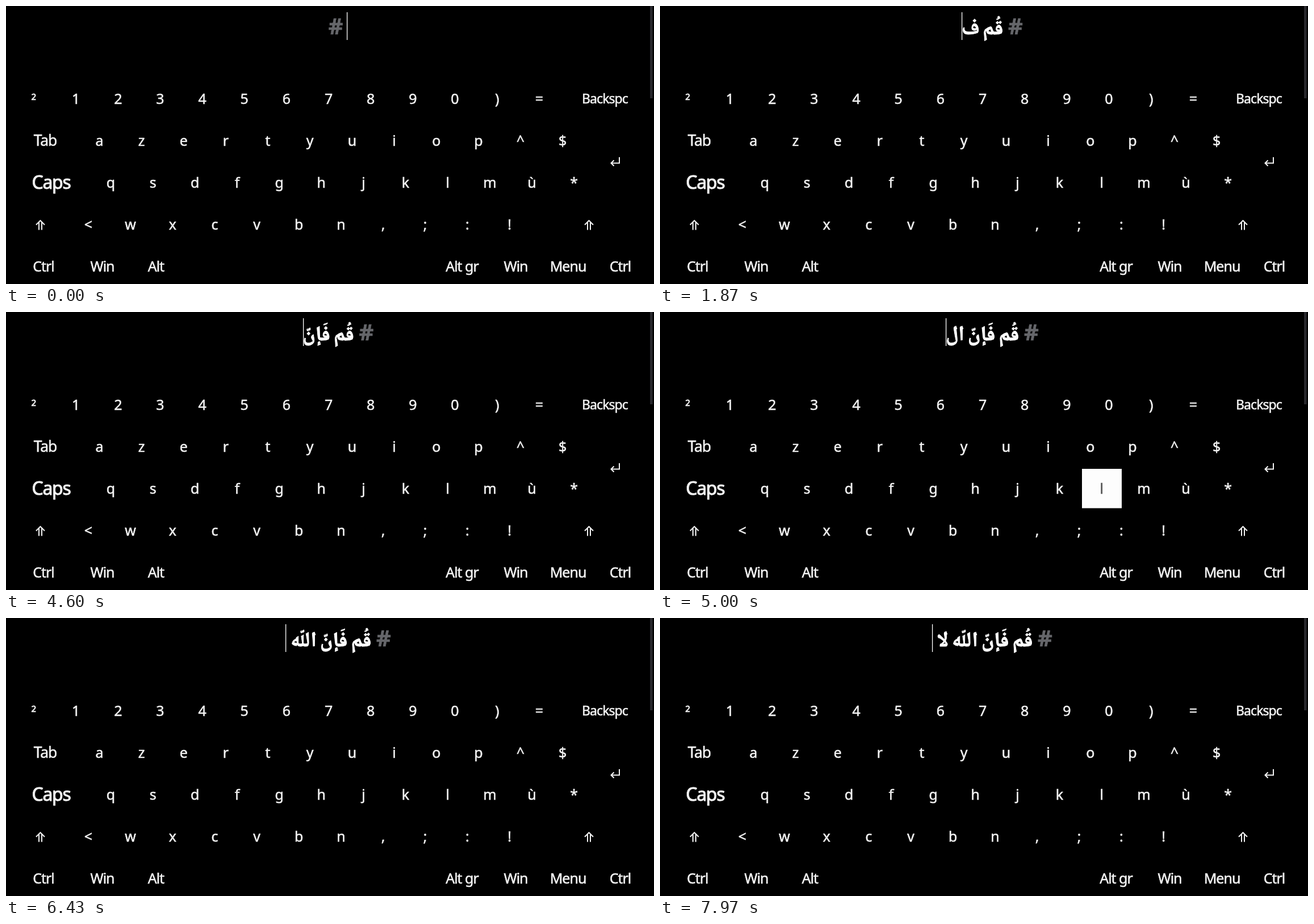
Animation of 1141 by 491 pixels, one loop 8 s. Source, as an HTML page:

```html
<!DOCTYPE html>
<html lang="en">
<head>
<meta charset="utf-8">
<title>On-screen keyboard</title>
<style>
html, body { margin: 0; width: 100%; height: 100%; overflow: hidden; background: #000; }
svg { display: block; width: 1141px; height: 491px; }
.label { font: 25px "Noto Sans", "Open Sans", sans-serif; letter-spacing: -0.04em; text-anchor: middle; color: #f4f4f4; fill: currentColor; stroke: currentColor; stroke-width: .55; }
.label.on { color: #555; }
.label.caps { stroke-width: 1; }
.icon { fill: none; stroke: #f4f4f4; stroke-width: 2; }
#hash { font: bold 40px "Open Sans", "Noto Sans", sans-serif; text-anchor: middle; fill: #65666a; stroke: #65666a; stroke-width: .6; }
#typed { font: bold 30px "Noto Naskh Arabic", "Noto Sans Arabic", "DejaVu Sans", sans-serif; word-spacing: -2px; direction: rtl; text-anchor: start; fill: #fff; stroke: #fff; stroke-width: 1; }
</style>
</head>
<body>
<svg viewBox="0 0 1141 491">
  <rect width="1141" height="491" fill="#000"/>
  <rect x="1134" y="0" width="4.5" height="163" fill="#29292e"/>
  <text id="hash" y="50">#</text>
  <text id="typed" y="50"></text>
  <rect id="caret" y="11" width="1.3" height="49" fill="#fff"/>
  <rect id="press" fill="#fdfdfd"/>
  <g id="labels"></g>
  <path id="shift" class="icon" d="M53 386.5 60.5 379 68 386.5M58 382V395.5M63 382V395.5"/>
  <use href="#shift" x="966"/>
  <path class="icon" d="M1080 267V277.5H1066M1070.5 272.5 1065.5 277.5 1070.5 282.5"/>
</svg>
<script>
const LOOP = 8000, HOLD = 110, BLINK = 530, PITCH = 74.15;
const MID = 585, HASH = 26, GAP = 8.5;
const get = id => document.getElementById(id);
const [hash, typed, caret, press, labels] = ["hash", "typed", "caret", "press", "labels"].map(get);
const keys = { " ": { x: 315, y: 425, w: 439, h: 65.5 } };

function label(text, x, y, size) {
  const el = document.createElementNS("http://www.w3.org/2000/svg", "text");
  el.setAttribute("class", "label");
  el.setAttribute("x", x);
  el.setAttribute("y", y);
  if (size) el.style.fontSize = size + "px";
  el.textContent = text;
  labels.append(el);
  return el;
}

// Rows of square keys: characters, centre of the first key, top edge
[["²1234567890)=", 49, 129], ["azertyuiop^$", 164.5, 203],
 ["qsdfghjklmù*", 184.5, 277], ["<wxcvbn,;:!", 145, 351]].forEach(([chars, x0, y]) => {
  [...chars].forEach((c, i) => {
    const x = x0 + i * PITCH;
    const el = label(c, x - .5, y + (c === "²" ? 47 : 44));
    keys[c] = { x: Math.round(x - 35), y, w: 70, h: 69.5, el };
  });
});
label("Backspc", 1054.5, 171.5, 23);
label("Tab", 69, 247, 26.5);
label("Caps", 79.5, 322.5, 32).classList.add("caps");
[["Ctrl", 66], ["Win", 169.5], ["Alt", 264], ["Alt gr", 803],
 ["Win", 897.5], ["Menu", 989.5], ["Ctrl", 1081.5]].forEach(([s, x]) => label(s, x, 469));

// Keystrokes: time, key, current word after it
const strokes = [
  [220, "q", "ق"], [480, "o", "قُ"], [740, "m", "قُم"], [1040, " ", "قُم"],
  [1750, "f", "ف"], [2150, "a", "فَ"], [3130, "2", "فَأ"], [3450, "i", "فَإ"],
  [3750, "n", "فَإن"], [4100, "n", "فَإنّ"], [4670, " ", "فَإنّ"],
  [4830, "a", "ا"], [4960, "l", "ال"], [5120, "l", "الل"], [5330, "a", "اللَ"],
  [5950, "h", "اللّه"], [6230, " ", "اللّه"],
  [6550, "l", "ل"], [6790, "a", "لَ"], [7385, " ", "لا"]
];
const states = [{ at: 0, text: "" }];
let done = "";
for (const [t, key, word] of strokes) {
  const space = key === " ";
  states.push({ at: space ? t + HOLD + 30 : t, text: done + word + (space ? " " : "") });
  if (space) done += word + " ";
}

// Choose the font size from the length of the whole line
typed.textContent = done.trim();
const size = 30 * 167 / typed.getComputedTextLength();
typed.style.fontSize = Math.max(24, Math.min(42, size)) + "px";
for (const s of states) {
  typed.textContent = s.text.trim();
  s.width = (s.text ? typed.getComputedTextLength() : 0) + (s.text.endsWith(" ") ? 9 : 0);
}

let shown = null, lit = null;

function showText(s) {
  const w = HASH + GAP + s.width, left = MID - w / 2, right = MID + w / 2;
  const rtl = s.text !== "";
  hash.setAttribute("x", rtl ? right - HASH / 2 : left + HASH / 2);
  typed.setAttribute("x", right - HASH - GAP);
  typed.textContent = s.text.trim();
  caret.setAttribute("x", rtl ? Math.round(left) : Math.floor(right - 1.5));
  shown = s;
}

function showKey(key) {
  if (lit && lit.el) lit.el.classList.remove("on");
  press.style.display = key ? "" : "none";
  if (key) {
    press.setAttribute("x", key.x);
    press.setAttribute("y", key.y);
    press.setAttribute("width", key.w);
    press.setAttribute("height", key.h);
    if (key.el) key.el.classList.add("on");
  }
  lit = key;
}

function draw(now) {
  const t = now % LOOP;
  const s = states.filter(v => v.at <= t).pop();
  if (s !== shown) showText(s);
  const hit = strokes.find(([at]) => t >= at && t < at + HOLD);
  showKey(hit ? keys[hit[1]] : null);
  caret.style.display = (t - s.at) % (2 * BLINK) < BLINK ? "" : "none";
}

const start = performance.now();
function tick() {
  draw(performance.now() - start);
  requestAnimationFrame(tick);
}
tick();
</script>
</body>
</html>
```
